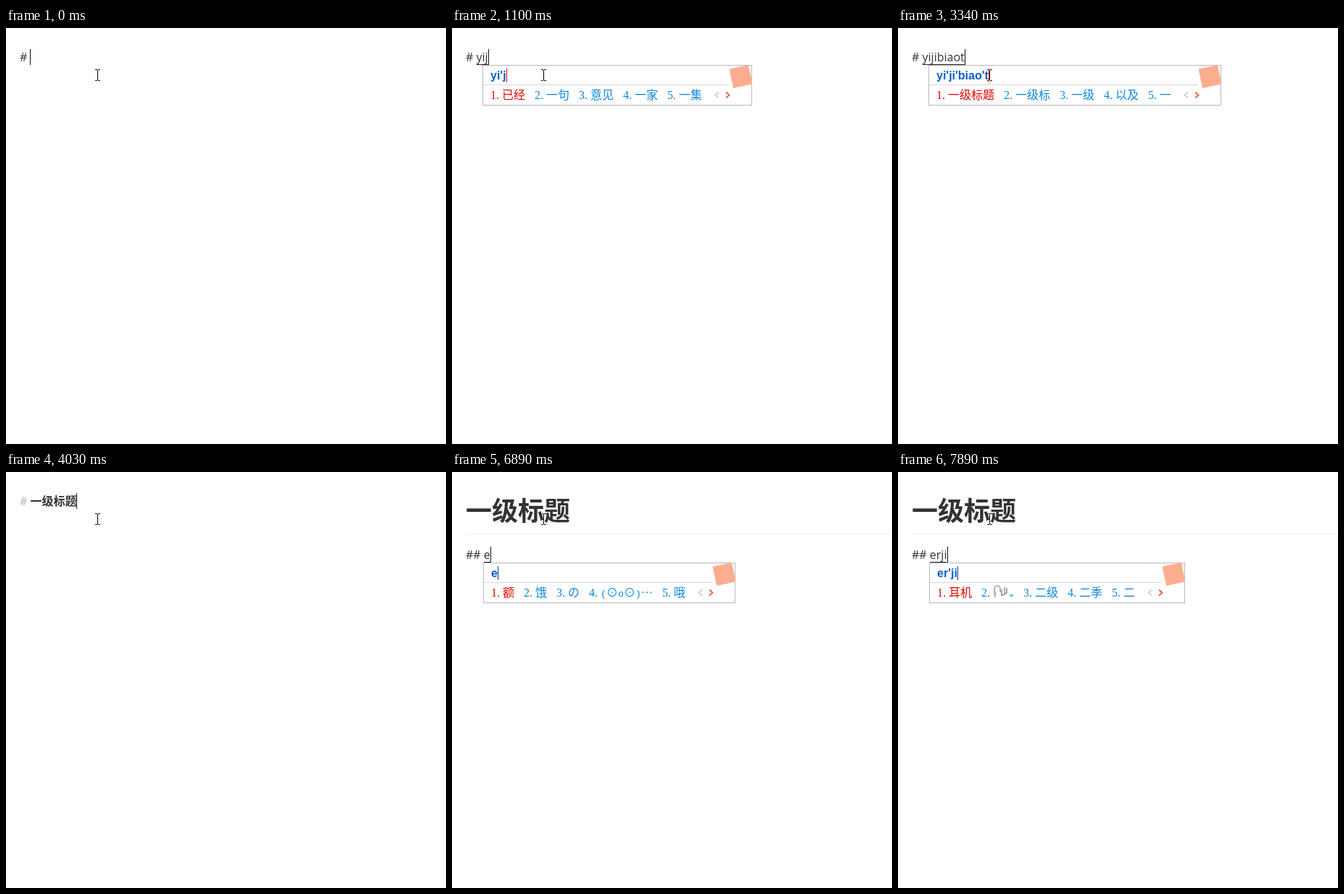
Recreate the animation shown at these times as an HTML page. Size 607x574 px, loop 7990 ms.

```html
<!DOCTYPE html>
<html lang="zh-CN">
<head>
<meta charset="utf-8">
<style>
  html, body { margin: 0; width: 100%; height: 100%; overflow: hidden; background: #fff; }
  #stage { position: relative; width: 607px; height: 574px; overflow: hidden; background: #fff; isolation: isolate;
    color: #333; font: 16px/22px "Open Sans", "Noto Sans CJK SC", "Noto Sans CJK", sans-serif; }
  #stage > *, #popup > * { position: absolute; white-space: nowrap; }
  [hidden] { display: none !important; }

  #title { left: 19px; top: 29px; width: 588px; height: 56px; border-bottom: 1px solid #eee;
    font-weight: bold; font-size: 36px; line-height: 50px; }
  #stage > #line { left: 19px; white-space: pre; }
  #line u { text-decoration: none; box-shadow: inset 0 -1px #222; }
  #line i { font-style: normal; color: #ccc; }
  .caret { position: absolute; width: 1px; height: 22px; background: #111; }

  #popup { box-sizing: border-box; height: 56px; border: 1px solid #b8b8b8; background: #fff; }
  #pinyin { left: 10px; top: 4px; color: #0a5fc8; font: bold 16px/19px "Liberation Sans", Arial, sans-serif; }
  #pinyin .caret { height: 19px; }
  #rule { left: 0; right: 31px; top: 26px; height: 1px; background: #d6d6d6; }
  #popup #list { position: static; display: flex; gap: 13px; margin: 28px 68px 0 10px; color: #0a87dc;
    font: 300 16px/23px "Noto Sans CJK SC", "Noto Sans CJK", sans-serif; }
  #list span:first-child { color: #e80000; }
  #list b { display: inline-block; width: 1em; font: 16px/1 "Liberation Serif", serif; }
  #list i { font: 13.333px/1 "Liberation Mono", monospace; }
  #list svg { vertical-align: -3px; }
  #tools { right: -1px; top: -1px; fill: none; stroke-width: 2; }
  #mouse { left: 123px; top: 57px; mix-blend-mode: difference; }
</style>
</head>
<body>
<div id="stage">
  <div id="title">一级标题</div>
  <div id="line"></div>
  <div id="popup">
    <div id="pinyin"></div>
    <div id="rule"></div>
    <div id="list"></div>
    <svg id="tools" width="69" height="55">
      <path d="M23 37.5l-4.5 4 4.5 4" stroke="#d2d2d2"/>
      <path d="M33 37.5l4.5 4-4.5 4" stroke="#ea6a48"/>
      <rect x="40" y="2.5" width="27" height="27" fill="#fbad90" transform="rotate(-12 53.5 16)"/>
    </svg>
  </div>
  <svg id="mouse" width="7" height="16">
    <path d="M0 .5h3m1 0h3M3.5 1v14M0 15.5h3m1 0h3" stroke="#fff" fill="none"/>
  </svg>
</div>
<script>
const LOOP = 7990;
const $ = id => document.getElementById(id);

const headphones = `<svg width="29" height="19" fill="none" stroke="#b4b4b4" stroke-width="2">
  <path d="M2 14V6q0-5 4-5t4 5v4M3 9v8" /><path d="M12 15V6m0 8l4-1V3m0 9l3-1V4" stroke="#8c8c8c" stroke-width="1.5"/>
  <path d="M22 13h7l-3.5 4z" fill="#6fb6ec" stroke="none"/></svg>`;

// Each step changes only the listed fields of the state before it.
const steps = [
  { t: 0, typed: '# ', comp: '', pinyin: '', list: '', caret: true, second: false },
  { t: 310, comp: 'y' },
  { t: 390, pinyin: 'y', list: '一 有 要 以 也' },
  { t: 770, comp: 'yi' },
  { t: 850, pinyin: 'yi', list: '一 以 已 亿 意' },
  { t: 1020, comp: 'yij' },
  { t: 1100, pinyin: "yi'j", list: '已经 一句 意见 一家 一集' },
  { t: 1320, comp: 'yiji', pinyin: "yi'ji", list: '一级 以及 一季 一集 一己' },
  { t: 1780, caret: false },
  { t: 2330, caret: true },
  { t: 2640, comp: 'yijib', pinyin: "yi'ji'b", list: '已基本 一季报 一级棒 以及被 一集' },
  { t: 2870, comp: 'yijibi' },
  { t: 2940, pinyin: "yi'ji'bi", list: '一级比 已极闭 一级B 以及 一集' },
  { t: 3100, comp: 'yijibiao', pinyin: "yi'ji'biao", list: '一级标 已极闭 一级B 以及 一集' },
  { t: 3340, comp: 'yijibiaot', pinyin: "yi'ji'biao't", list: '一级标题 一级标 一级 以及 一' },
  { t: 3490, comp: 'yijibiaoti', pinyin: "yi'ji'biao'ti" },
  { t: 3880, pinyin: '' },
  { t: 3950, typed: '# 一级标题', comp: '' },
  { t: 4030, typed: '<b><i>#</i> 一级标题</b>' },
  { t: 4260, typed: '', second: true },
  { t: 4810, caret: false },
  { t: 5270, caret: true },
  { t: 5730, caret: false },
  { t: 5880, typed: '#', caret: true },
  { t: 6110, typed: '##' },
  { t: 6340, typed: '## ' },
  { t: 6890, comp: 'e', pinyin: 'e', list: '额 饿 の (⊙o⊙)⋯ 哦' },
  { t: 7030, comp: 'er', pinyin: 'er', list: '二 而 儿 尔 耳' },
  { t: 7430, comp: 'erj', pinyin: "er'j", list: '耳机 ♫ 二级 二季 二届' },
  { t: 7580, comp: 'erji' },
  { t: 7660, pinyin: "er'ji", list: '耳机 ♫ 二级 二季 二' }
];
const states = [];
for (const step of steps) states.push({ ...states.at(-1), ...step });

const caret = (color, shift = 0) =>
  `<span class="caret" style="background:${color};margin-left:${shift}px"></span>`;

const candidate = (word, i) =>
  `<span><b>${i + 1}.</b>${word.replace(/[!-~]+/g, '<i>$&</i>').replace('♫', headphones)}</span>`;

function draw({ typed, comp, pinyin, list, caret: blink, second }) {
  // Nudges the caret to the whole pixel it snaps to.
  const shift = comp ? 0.1 : typed.endsWith(' ') ? -0.4 : -0.1;
  $('title').hidden = !second;
  $('line').style.top = (second ? 103 : 29) + 'px';
  $('line').innerHTML = `${typed}<u>${comp}</u>${blink ? caret('#111', shift) : ''}`;
  $('popup').hidden = !pinyin;
  $('popup').style.left = (second ? 43 : 42) + 'px';
  $('popup').style.top = (second ? 125 : 51) + 'px';
  $('pinyin').innerHTML = pinyin + caret(second ? '#123c78' : '#f00');
  $('list').innerHTML = list.split(' ').map(candidate).join('');
}

let shown;
function tick() {
  const now = performance.now() % LOOP;
  const state = states.findLast(s => s.t <= now);
  if (state !== shown) draw(shown = state);
  requestAnimationFrame(tick);
}
tick();
</script>
</body>
</html>
```
